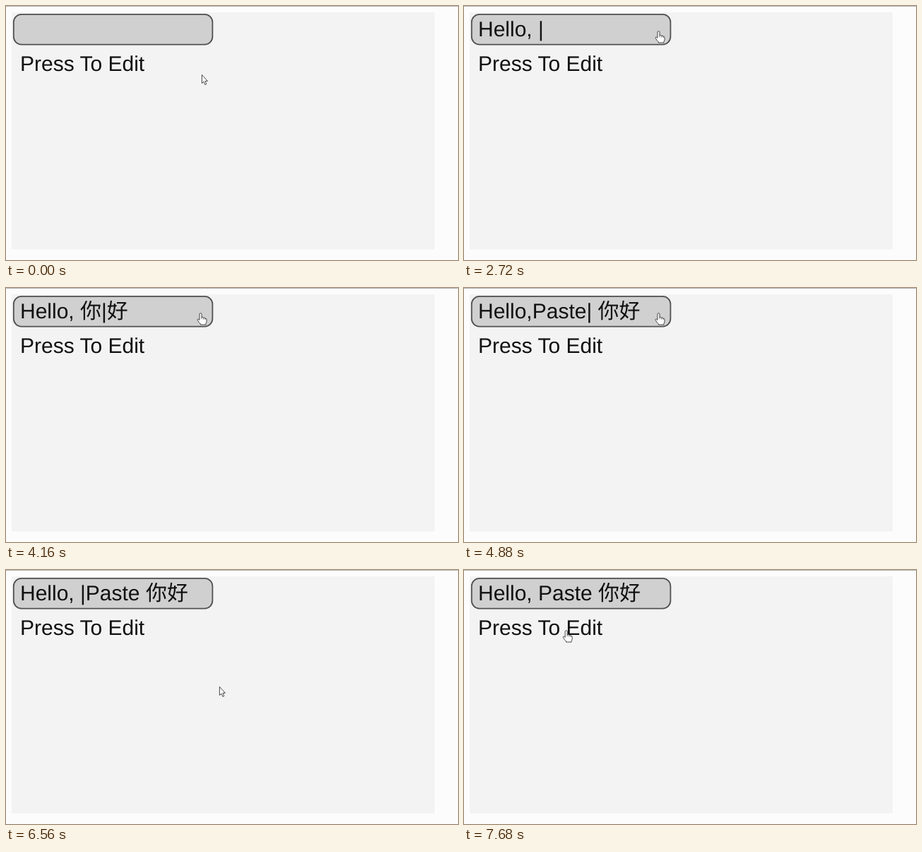
An HTML page for the animation above (8000 ms loop, 640 by 360 pixels).

```html
<!DOCTYPE html>
<html lang="en">
<head>
<meta charset="utf-8">
<title>Editable text field</title>
<style>
  html, body { margin: 0; width: 100%; height: 100%; overflow: hidden; background: #fcfcfc; }
  svg { display: block; width: 640px; height: 360px; }
  text {
    font: 300 30px "Liberation Sans", Arial, "Noto Sans CJK TC", "Noto Sans CJK SC", "Noto Sans CJK JP", "Noto Sans CJK", sans-serif;
    fill: #111;
    white-space: pre;
    text-rendering: geometricPrecision;
  }
  #cursor path { fill: #fff; stroke: #333; stroke-width: .9; stroke-linejoin: round; }
</style>
</head>
<body>
<svg viewBox="0 0 640 360">
  <rect width="640" height="360" fill="#fcfcfc"/>
  <rect width="640" height="1" fill="#b4b4b4"/>
  <rect x="8" y="9" width="599" height="336" fill="#f3f3f3"/>
  <rect x="10.8" y="11.8" width="281.6" height="42.8" rx="11" fill="#d0d0d0" stroke="#505050" stroke-width="1.8"/>
  <text id="field" x="20" y="43"></text>
  <text x="20" y="91.6">Press To Edit</text>
  <g id="cursor">
    <path id="arrow" d="M.4 .5V12.6L3 10.2 4.9 14.5 6.8 13.7 5 9.4H8.4Z"/>
    <g id="hand">
      <path d="M-1.5 1.8Q-1.5 .4 0 .4T1.5 1.8V6.3Q3.7 5.5 4.1 7 6.1 6.4 6.5 7.9 8.5 7.6 8.5 9.5V12Q8.5 14 7.4 15.4V16.8H-.2V15.6Q-2.6 13.5-4.3 10.4-4.8 8.6-3.1 8.8L-1.5 10.2Z"/>
      <path d="M1.5 6V9M4.1 7V9.4M6.5 7.9V9.8" style="fill:none;stroke-width:.7"/>
    </g>
  </g>
</svg>
<script>
const LOOP = 8000, STEP = 80;
const $ = id => document.getElementById(id);
const field = $("field"), cursor = $("cursor"), arrow = $("arrow"), hand = $("hand");

// Each edit: time and the field's content, with "|" as the caret.
const edits = [
  [0, ""],
  [720, "|"],
  [1280, "H|"],
  [1440, "He|"],
  [1760, "Hel|"],
  [1920, "Hell|"],
  [2160, "Hello|"],
  [2480, "Hello,|"],
  [2720, "Hello, |"],
  [3120, "Hello, ㄋ|"],
  [3200, "Hello, ㄋㄧ|"],
  [3360, "Hello, 你|"],
  [3520, "Hello, 你ㄏ|"],
  [3680, "Hello, 你ㄏㄠ|"],
  [3760, "Hello, 你好|"],
  [4160, "Hello, 你|好"],
  [4400, "Hello, |你好"],
  [4560, "Hello,| 你好"],
  [4880, "Hello,Paste| 你好"],
  [5360, "Hello,Past|e 你好"],
  [5440, "Hello,Pas|te 你好"],
  [5600, "Hello,Pa|ste 你好"],
  [5760, "Hello,P|aste 你好"],
  [5920, "Hello,|Paste 你好"],
  [6160, "Hello, |Paste 你好"],
  [6640, "Hello, Paste 你好"]
];

// Each move: start, end, from, control point, to.
const moves = [
  [80, 320, [277, 97], [277, 66], [275.5, 35.2]],
  [6320, 6560, [275.5, 35.2], [292, 100], [302, 165]],
  [6880, 7680, [302, 165], [190, -25], [144.7, 85.3]]
];

const ease = p => p * p * (3 - 2 * p);

function pointerAt(t) {
  const move = moves.findLast(m => t >= m[0]) || moves[0];
  const [start, end, from, control, to] = move;
  const p = ease(Math.min(1, Math.max(0, (t - start) / (end - start))));
  return from.map((a, i) => a * (1 - p) ** 2 + 2 * control[i] * p * (1 - p) + to[i] * p * p);
}

function overField([x, y]) {
  return x > 10 && x < 293 && ((y > 11 && y < 55) || (x < 198 && y > 62 && y < 100));
}

function draw(time) {
  const t = Math.floor((time % LOOP) / STEP) * STEP;
  const content = edits.findLast(e => t >= e[0])[1];
  if (field.textContent !== content) field.textContent = content;
  const pos = pointerAt(t), hovering = overField(pos);
  cursor.setAttribute("transform", `translate(${pos})`);
  arrow.style.display = hovering ? "none" : "";
  hand.style.display = hovering ? "" : "none";
}

const begin = performance.now();
function tick() {
  draw(performance.now() - begin);
  requestAnimationFrame(tick);
}
tick();
</script>
</body>
</html>
```
